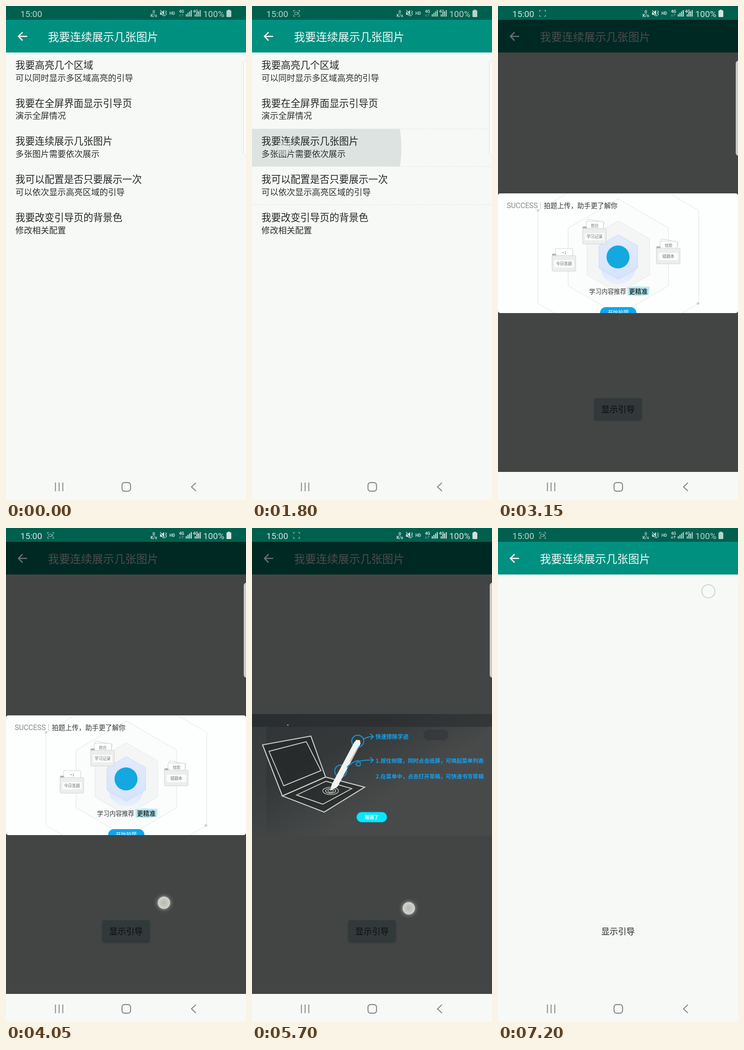
Recreate the animation shown at these times as an HTML page with a canvas. Size 522x1073 px, loop 7350 ms.

```html
<!DOCTYPE html>
<html lang="zh-CN">
<head>
<meta charset="utf-8">
<title>引导页演示</title>
<style>
html, body { margin: 0; width: 100%; height: 100%; overflow: hidden; background: #f7f9f7; }
canvas { display: block; width: 522px; height: 1073px; }
</style>
</head>
<body>
<canvas id="stage" width="522" height="1073"></canvas>
<script>
const c = document.getElementById('stage').getContext('2d');
const LOOP = 7350, STEP = 150;
const CJK = '"Noto Sans CJK SC", "Noto Sans CJK", sans-serif';
const ROBOTO = 'Roboto, sans-serif';
const BG = '#f7f9f7';

const T = {
  frame: 300, camera: 1350, press: 1650, leave: 1950, page: 2100, cameraOff: 2550,
  tap: 2850, guide: 3150, cameraOn: 3600, tap2: 3900, photo: 4200, tap3: 4650,
  pen: 4950, cameraOff2: 5100, tap4: 5550, done: 5850, cameraOn2: 6600, tap5: 6900
};

const items = [
  ['我要高亮几个区域', '可以同时显示多区域高亮的引导'],
  ['我要在全屏界面显示引导页', '演示全屏情况'],
  ['我要连续展示几张图片', '多张图片需要依次展示'],
  ['我可以配置是否只要展示一次', '可以依次显示高亮区域的引导'],
  ['我要改变引导页的背景色', '修改相关配置']
];

const within = (t, a, b) => t >= a && t < b;

// y is the visual middle of the glyphs
function text(s, x, y, size, color, o = {}) {
  c.save();
  c.translate(x, y);
  c.rotate((o.tilt || 0) * Math.PI / 180);
  c.font = `${o.weight || 400} ${size}px ${o.font || CJK}`;
  c.textAlign = o.align || 'left';
  c.letterSpacing = (o.gap || 0) + 'px';
  c.fillStyle = color;
  c.fillText(s, 0, size * 0.37);
  c.restore();
}

function rect(x, y, w, h, fill) {
  c.fillStyle = fill;
  c.fillRect(x, y, w, h);
}

function paint(fill, stroke, width = 1) {
  if (fill) { c.fillStyle = fill; c.fill(); }
  if (stroke) { c.strokeStyle = stroke; c.lineWidth = width; c.stroke(); }
}

function round(x, y, w, h, r, fill, stroke, width) {
  c.beginPath();
  c.roundRect(x, y, w, h, r);
  paint(fill, stroke, width);
}

function ellipse(x, y, rx, ry, fill, stroke, width) {
  c.beginPath();
  c.ellipse(x, y, rx, ry, 0, 0, Math.PI * 2);
  paint(fill, stroke, width);
}

const circle = (x, y, r, fill, stroke, width) => ellipse(x, y, r, r, fill, stroke, width);

function trace(pts) {
  c.beginPath();
  for (let i = 0; i < pts.length; i += 2) c.lineTo(pts[i], pts[i + 1]);
}

function poly(pts, fill, stroke, width) {
  trace(pts);
  c.closePath();
  paint(fill, stroke, width);
}

function line(pts, stroke, width) {
  trace(pts);
  paint(null, stroke, width);
}

function curve(d, stroke, width) {
  c.strokeStyle = stroke;
  c.lineWidth = width;
  c.stroke(new Path2D(d));
}

function gradient(x0, y0, x1, y1, ...colors) {
  const g = c.createLinearGradient(x0, y0, x1, y1);
  colors.forEach((col, i) => g.addColorStop(i / (colors.length - 1), col));
  return g;
}

function clipped(x, y, w, h, r, draw) {
  c.save();
  c.beginPath();
  c.roundRect(x, y, w, h, r);
  c.clip();
  draw();
  c.restore();
}

function recorder(t) {
  if (t < T.frame) return;
  const ink = '#94bfb4';
  curve('M90.5 13V9.5H94M100 9.5H103.5V13M103.5 19V22.5H100M94 22.5H90.5V19', ink, 1.2);
  const on = within(t, T.camera, T.cameraOff) || within(t, T.cameraOn, T.cameraOff2) || t >= T.cameraOn2;
  if (!on) return;
  round(93, 13.2, 6, 5.6, 1, null, ink, 1.1);
  line([99, 15.5, 101.5, 13.8, 101.5, 18.2, 99, 16.5], ink, 1);
}

function signal(x, ink) {
  for (let i = 0; i < 4; i++) {
    const h = 5 + i * 3;
    rect(x + i * 3.6, 23 - h, 2.2, h, ink);
  }
}

function statusBar(t, dim) {
  const ink = dim ? '#d3e4df' : '#b2d6cc';
  const small = { font: ROBOTO, weight: 700, align: 'center' };
  rect(0, 0, 522, 30, '#006050');
  text('15:00', 31.3, 16.5, 19, ink, { font: ROBOTO });
  recorder(t);
  text('0', 321.5, 12, 9.5, ink, small);
  text('K/s', 321.5, 20.5, 9.5, ink, small);
  poly([335, 13, 338.5, 13, 344, 9, 344, 23, 338.5, 19, 335, 19], ink);
  line([334.5, 9, 346, 23], '#006050', 2.6);
  line([335.5, 9, 346, 22], ink, 1.3);
  curve('M347 10l2 2.5l-2 2.5l2 2.5l-2 3', ink, 1.3);
  text('HD', 361.5, 15.5, 9, ink, small);
  text('4G', 381.8, 12, 9, ink, small);
  c.globalAlpha = t >= 7200 ? 1 : 0.4;
  curve('M378.5 17V22.5M376.5 20.5L378.5 22.5L380.5 20.5M384 23V17.5M382 19.5L384 17.5L386 19.5', ink, 1.1);
  c.globalAlpha = 1;
  signal(391, ink);
  text('4G', 412.5, 12, 9, ink, small);
  signal(410.5, ink);
  text('100%', 428.9, 16.5, 19, ink, { font: ROBOTO });
  round(479.5, 9.5, 10.5, 14.5, 1.5, ink);
  rect(482.5, 8, 4.5, 2, ink);
}

function barContent(ink, arrow) {
  line([46, 66, 27, 66], arrow, 2.5);
  line([36, 57, 27, 66, 36, 75], arrow, 2.5);
  text('我要连续展示几张图片', 91.3, 67, 24, ink);
}

function navBar() {
  const ink = '#868986';
  rect(0, 1012, 522, 61, BG);
  for (const x of [107.5, 115.5, 123.5]) line([x, 1035, x, 1054], ink, 2);
  round(252.3, 1035.2, 18.6, 18.6, 5.5, null, ink, 2.2);
  line([413, 1035.5, 403.5, 1044.5, 413, 1053.5], ink, 2.2);
}

function list(t) {
  if (t >= T.camera) {
    c.setLineDash([2, 2]);
    for (const y of [267, 348.5, 431.5]) line([0, y, 522, y], '#dde1de', 1);
    c.setLineDash([]);
  }
  if (t >= T.press) {
    const r = t < T.press + STEP ? 120 : 256;
    clipped(0, 267, 522, 81.5, 0, () => circle(69, 308, r, '#dde3e0'));
  }
  items.forEach(([head, sub], i) => {
    const y = 128 + i * 82.7;
    text(head, 20.5, y, 21.15, '#222624');
    text(sub, 20.6, y + 28, 18.3, '#2b2f2d');
  });
}

function button(t) {
  if (t < T.done) {
    c.save();
    c.shadowColor = 'rgba(0,0,0,.35)';
    c.shadowBlur = 4;
    c.shadowOffsetY = 2;
    const face = t >= T.guide ? '#b9cbd3' : t >= T.tap ? '#bcbdba' : '#d6d7d7';
    round(210, 852, 102, 46, 2, face);
    c.restore();
  }
  text('显示引导', 261, 876, 18.3, '#222624', { align: 'center' });
}

function edgePanel(dim) {
  if (dim) return round(517, 119, 14, 206, 6, '#c9cbca');
  c.setLineDash([2, 1.5]);
  round(516.5, 118.5, 14, 207, 7, '#fbfdfc', '#bac4c0', 1);
  c.setLineDash([]);
}

function hexagon(r, fill, stroke) {
  const pts = [];
  for (let i = 0; i < 6; i++) {
    const a = Math.PI * (i / 3 + 0.5);
    pts.push(261.7 + r * Math.cos(a), 545 + r * Math.sin(a));
  }
  poly(pts, fill, stroke, 1);
}

function folder(x, y, label, note, sheets) {
  const edge = '#cfd2d1', mid = { align: 'center' };
  if (sheets) {
    c.save();
    c.translate(x + 27, y - 8);
    c.rotate(0.17);
    round(-18, -9, 37, 22, 1, '#fff', edge, 1);
    c.restore();
  }
  round(x + 8, y - 15, 37, 20, 1, '#fff', edge, 1);
  text(note, x + 26.5, y - 6, 8.2, '#777', mid);
  round(x, y - 4, 9, 10, 2, '#aeb2b1');
  round(x, y, 51.5, 34, 2, '#eceeed', edge, 1);
  round(x + 5, y + 10, 42, 16, 1, '#fafbfa');
  text(label, x + 26, y + 18, 8.7, '#6b6d6c', mid);
}

function successCard() {
  clipped(0, 407, 522, 260, 5, () => {
    rect(0, 407, 522, 260, '#fdfefe');
    hexagon(202, null, '#dde5e6');
    hexagon(126, '#fbfcfc', '#dde3e4');
    hexagon(78.5, '#f4f6f6', '#e1e7e9');
    circle(261, 567, 38, gradient(0, 545, 0, 605, '#cfe0fc', '#e9f0fd'));
    hexagon(48.5, gradient(0, 497, 0, 594, '#e3ebfb', '#d5e3fb'), '#c6d8f4');
    circle(87, 444, 3, '#d5d9da');
    circle(435, 646, 3, '#d0d4d5');
    circle(261, 545, 25, '#14a8e0');
    text('SUCCESS', 19, 433.3, 15.7, '#8b8b8b', { font: ROBOTO });
    rect(92, 426, 1, 14, '#bbb');
    text('拍题上传，助手更了解你', 99.8, 433.3, 14.55, '#363636', { weight: 500 });
    folder(184, 483, '学习记录', '题目', true);
    folder(117.5, 542, '今日答题', '+1');
    folder(344.5, 526, '错题本', '错题', true);
    text('学习内容推荐', 198, 620, 13.5, '#3a3a3a');
    poly([281, 611, 300, 609, 330, 610, 328, 628, 306, 630, 282, 629], '#b6ebf2');
    text('更精准', 284.7, 620, 13.5, '#24383c', { weight: 700 });
    round(222, 654, 79, 25, 12.5, '#0ea5ee');
    text('开始拍题', 261.5, 666, 11.4, '#fff', { align: 'center' });
  });
}

function writingPhoto() {
  clipped(0, 388, 522, 297, 0, () => {
    rect(0, 388, 522, 297, gradient(0, 0, 522, 0, '#273c5c', '#24396c', '#213450'));
    poly([0, 425, 3, 425, 20, 685, 0, 685], gradient(0, 425, 0, 685, '#24375f', '#1c3d7c', '#23649f'));
    poly([486, 406, 522, 404, 522, 685, 480, 685], gradient(0, 406, 0, 685, '#273e5f', '#2c507c', '#457fa8'));
    poly([1, 423, 486, 406, 481, 685, 19, 685], gradient(0, 410, 0, 685, '#a6a79f', '#989890'));
    poly([511, 406, 522, 405, 522, 685, 519, 685], gradient(0, 405, 0, 685, '#5f6970', '#3c4348', '#171b1e'));
    rect(515, 388, 7, 8, '#3290b8');
    rect(2, 405, 8, 11, '#2e7cb4');
    text('圆的面积的计算', 16, 409, 8.7, '#9299a6', { tilt: -1 });
    line([31, 473, 24, 474, 25, 491, 32, 491], '#777a79', 1.5);
    line([364, 420, 410, 418], '#66696b', 2);
    circle(462, 427, 1.3, '#55585a');

    poly([29, 433, 74, 430, 84, 626, 41, 627], '#3e4043');
    poly([74, 430, 459, 417, 456, 614, 84, 626], gradient(74, 0, 459, 0, '#edece3', '#f2f0e7'));
    poly([75, 445, 70, 452, 76, 458], '#edece3');
    ['01', '02', '03', '04', '05'].forEach((n, i) =>
      text(n, 52 + i * 2.5, 453 + i * 39, i ? 12.5 : 14, i ? '#b9bbba' : '#fff',
        { font: ROBOTO, weight: 700, align: 'center', tilt: -2 }));

    const slant = { tilt: -1.5 }, pencil = '#727675';
    text('规范书写', 105.5, 463, 15.5, '#5b5d5b', slant);
    text('为了提高智能批改的正确率，请规范书写', 106, 484, 9.55, '#a9aaa7', slant);
    poly([108, 511, 251, 505, 252, 575, 110, 579], null, '#dfddd4', 1);
    poly([274, 505, 418, 500, 420, 570, 276, 575], null, '#dfddd4', 1);
    text('依依', 139.5, 545, 18, pencil, slant);
    text('似君子', 174.5, 543.5, 17.5, pencil, { tilt: -1.5, gap: -4.5 });
    text('依依似君子', 298.5, 540, 18, pencil, { tilt: -1.5, gap: 1.7 });
    line([232, 506, 250, 523], '#de5450', 5);
    line([249, 505, 232, 524], '#de5450', 5);
    poly([398, 511, 402, 508, 407, 513, 422, 499, 408, 521], '#0c8b7d');
    text('书写过于', 111, 594, 8.2, '#6d6e6a', slant);
    text('紧', 143.8, 593, 8.2, '#c8544e', slant);
    text('密', 152, 593, 8.2, '#6d6e6a', slant);
    text('字与字应该有适当的间隔', 276, 589.5, 8.4, '#6d6e6a', slant);
    round(215.5, 650, 65, 21, 10.5, '#f6f8f4');
    text('继续', 248, 660.5, 10.3, '#2cb2bf', { weight: 700, align: 'center' });
  });
}

function penPhoto() {
  clipped(0, 404, 522, 264, 0, () => {
    rect(0, 404, 522, 264, gradient(0, 404, 160, 668, '#303436', '#353839', '#484a4a'));
    rect(0, 404, 522, 28, 'rgba(36,40,42,.5)');
    rect(0, 432, 31, 236, 'rgba(70,76,77,.3)');
    rect(510, 432, 12, 236, 'rgba(70,74,76,.35)');
    round(373, 438, 54, 23, 11, 'rgba(40,44,50,.4)');
    circle(78, 428, 1.5, '#a5a8a5');

    const chalk = '#cdcec9', blue = '#159bdd', shade = 'rgba(32,35,36,.6)';
    poly([23, 471, 128, 452, 160, 541, 66, 582], shade, chalk, 2.2);
    poly([37, 485, 118, 464, 150, 527, 69, 560], null, chalk, 1.9);
    poly([66, 582, 160, 541, 245, 563, 157, 617], shade, chalk, 2.2);
    poly([97, 580, 161, 550, 217, 566, 154, 600], null, chalk, 1.9);
    for (const r of [17, 11, 6]) ellipse(171, 571, r, r * 0.48, null, chalk, 1.4);

    circle(230, 463, 13, null, blue, 2);
    circle(193, 528, 13, null, blue, 2);
    poly([170, 571, 173, 558, 222, 466, 227, 460, 235, 461, 236, 469, 186, 562], '#f2f3ef');
    line([213, 507, 233, 473], '#9a9c99', 1.3);
    curve('M242 459Q250 453 264 453M257 447L264 453L258 459', blue, 2);
    curve('M206 520Q217 508 231 505Q238 510 235 516Q229 519 226 513Q230 503 264 504M257 498L264 504L258 510', blue, 2);

    const ink = '#12a2f4', bold = { weight: 700 };
    text('快速擦除字迹', 268.5, 454, 12, ink, bold);
    text('1.按住侧键，同时点击纸屏，可唤起菜单列表', 269, 506, 11.8, ink, bold);
    text('2.在菜单中，点击打开草稿，可快速书写草稿', 269, 540, 11.8, ink, bold);
    round(227.5, 617, 66, 22, 11, '#0be7fa', '#1597cc', 1);
    text('知道了', 260.5, 628, 10, '#fff', { weight: 700, align: 'center' });
  });
}

function glowDot(x, y) {
  c.save();
  c.shadowColor = 'rgba(230,232,228,.7)';
  c.shadowBlur = 8;
  circle(x, y, 13.5, '#cfd0ca');
  c.restore();
  const g = c.createRadialGradient(x, y, 1, x, y, 12);
  g.addColorStop(0, '#b9bab2');
  g.addColorStop(1, '#cfd0ca');
  circle(x, y, 12, g);
}

function touches(t) {
  if (within(t, T.press, T.leave)) circle(69, 310, 14, 'rgba(232,236,233,.5)', '#bfc6c2', 1.2);
  if (within(t, T.tap, T.guide)) circle(286, 873, 13, 'rgba(214,218,214,.55)');
  if (within(t, T.tap2, T.photo) || within(t, T.tap3, T.pen)) glowDot(343.5, 814);
  if (within(t, T.tap4, T.done)) glowDot(341, 826);
  if (t >= T.tap5) circle(457.5, 137.5, 14.3, '#f8faf9', '#c6d1ce', 1.8);
}

function draw(time) {
  const t = Math.floor(time / STEP) * STEP;
  const dim = within(t, T.guide, T.done);
  rect(0, 0, 522, 1073, BG);
  if (t < T.page) {
    c.globalAlpha = t < T.leave ? 1 : 0.3;
    list(Math.min(t, T.leave - STEP));
    c.globalAlpha = 1;
  }
  if (t >= T.leave) button(t);
  rect(0, 30, 522, 71, '#009080');
  if (dim) {
    rect(0, 30, 522, 982, 'rgba(0,5,3,.735)');
    barContent('#4c4d4b', '#687571');
  } else {
    barContent('#f4faf8', '#fff');
  }
  statusBar(t, dim);
  navBar();
  if (t < T.done) edgePanel(dim);
  if (dim) (t < T.photo ? successCard : t < T.pen ? writingPhoto : penPhoto)();
  touches(t);
}

const start = performance.now();
function tick() {
  draw((performance.now() - start) % LOOP);
  requestAnimationFrame(tick);
}
tick();
</script>
</body>
</html>
```
